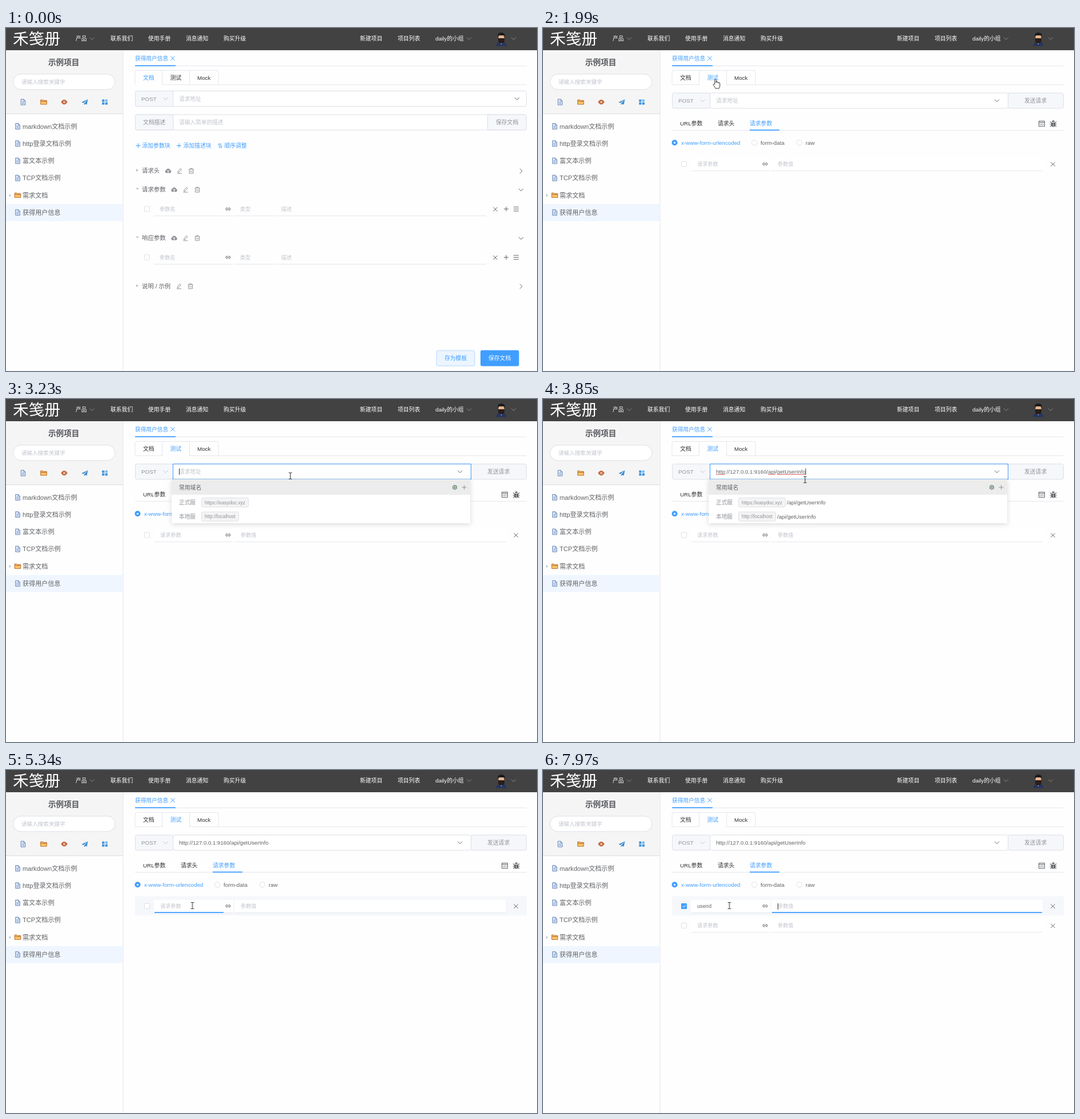
Write an HTML page that moves like this. It is 930 px wide and 602 px high and loops after 8000 ms.

```html
<!DOCTYPE html>
<html lang="zh-CN">
<head>
<meta charset="utf-8">
<title>接口测试演示</title>
<style>
html, body { margin: 0; width: 100%; height: 100%; overflow: hidden; background: #fefefe; }
svg { display: block; }
text { font-family: 'Liberation Sans', 'Noto Sans CJK SC', 'Noto Sans CJK', sans-serif; white-space: pre; }
.icon { fill: none; stroke: currentColor; stroke-width: 1; }
.grow { transform-box: fill-box; transform-origin: center; }
#drop { transform-origin: 290px 141px; }
#dropBox { filter: drop-shadow(0 2px 4px rgba(0, 0, 0, .14)); }
</style>
</head>
<body>
<svg id="stage" width="930" height="602" viewBox="0 0 930 602">
  <defs>
    <g id="down" class="icon"><path d="M-4-2 0 2 4-2"/></g>
    <g id="right" class="icon"><path d="M-2-4 2 0-2 4"/></g>
    <g id="cross" class="icon"><path d="M-3.7-3.7 3.7 3.7M3.7-3.7-3.7 3.7"/></g>
    <g id="plus" class="icon"><path d="M-4 0H4M0-4V4"/></g>
    <g id="menu" class="icon"><path d="M-4.5-3.5H4.5M-4.5 0H4.5M-4.5 3.5H4.5"/></g>
    <g id="link" class="icon"><path d="M-.8-2H-2a2 2 0 0 0 0 4h1.2M.8-2H2a2 2 0 0 1 0 4H.8M-2 0H2"/></g>
    <g id="sort" class="icon"><path d="M-1.3 4V-4L-4-1M1.3-4V4L4 1"/></g>
    <g id="cloud">
      <path d="M-2.8 4a2.7 2.7 0 0 1-.5-5.3 3.5 3.5 0 0 1 6.7 0A2.7 2.7 0 0 1 2.9 4Z" fill="currentColor"/>
      <path d="M0 4V-.5M-2 1 0-1 2 1" fill="none" stroke="#fff"/>
    </g>
    <g id="pencil" class="icon"><path d="M-3 3.2-2.4.6 1.5-4 3.4-2.4-.5 2.3ZM-4 4.6H4"/></g>
    <g id="trash" class="icon"><path d="M-4.5-2.7H4.5M-1.6-2.7V-4.3H1.6V-2.7M-3.5-2.7V4.5H3.5V-2.7M-1.2-.5V2.5M1.2-.5V2.5"/></g>
    <g id="doc">
      <path d="M-3.8-5H1L3.8-2V5H-3.8Z" fill="#dce7f8" stroke="#6685b5"/>
      <path d="M1-5V-2H3.8M-2 0H2M-2 2.3H2" fill="none" stroke="#6685b5" stroke-width=".8"/>
    </g>
    <g id="folder">
      <path d="M-5.3 4V-4H-1.5L-.3-2.8H5.3V4Z" fill="#f6c667" stroke="#c26a30"/>
      <path d="M-5-1.3H5" stroke="#c26a30" stroke-width="1.2"/>
    </g>
    <g id="eye">
      <path d="M-5.7 0Q0-8.4 5.7 0 0 8.4-5.7 0Z" fill="#c4683d"/>
      <circle r="1.8" fill="#fff"/><circle r=".8" fill="#8c3f20"/>
    </g>
    <g id="plane"><path d="M5.5-5-5.5.3-2.5 1.8ZM5.5-5-1.2 2.6V5.3L.7 3.3 3.5 4.5Z" fill="#3b8ccf"/></g>
    <g id="grid">
      <path d="M-4.8-4.6H-.6V-.6H-4.8ZM-4.8.6H-.6V4.6H-4.8ZM.7.6H4.9V4.6H.7Z" fill="#3c93de"/>
      <path d="M.7-4.6H4.9V-.6H.7Z" fill="#75b8f0"/>
    </g>
    <g id="code" class="icon">
      <path d="M-5-4.7H5V4.7H-5ZM-5-2.5H5"/>
      <path d="M-1.7-.7-3.3 1-1.7 2.7M1.7-.7 3.3 1 1.7 2.7M.6-.9-.6 2.9" stroke-width=".8"/>
    </g>
    <g id="bug">
      <path d="M-2.5-3.2a2.5 2.5 0 0 1 5 0ZM-3.5-2H3.5V2a3.5 3.5 0 0 1-7 0Z" fill="currentColor"/>
      <path d="M-5.5-3.7-3-1.2M5.5-3.7 3-1.2M-6 1H6M-5.3 5.2-3 2.8M5.3 5.2 3 2.8" stroke="currentColor" stroke-width="1.2"/>
      <path d="M0-1V5" stroke="#fff" stroke-width=".8"/>
    </g>
    <g id="gear">
      <path d="M0-4.5 4-2.3V2.3L0 4.5-4 2.3V-2.3Z" fill="#7f9885"/>
      <circle r="2.2" fill="#e9eeea"/><circle r="1.2" fill="#587a62"/>
    </g>
  </defs>
</svg>
<script>
const LOOP = 8000;
const BLUE = '#409eff', INK = '#303133', TEXT = '#606266', MUTE = '#909399',
      HINT = '#c0c4cc', EDGE = '#dcdfe6', PALE = '#f5f7fa';
const stage = document.getElementById('stage');

const text = (x, y, size, str, fill = TEXT, more = '') =>
  `<text x="${x}" y="${(y + size * .37).toFixed(2)}" font-size="${size}" fill="${fill}" ${more}>${str}</text>`;
const icon = (id, x, y, color = TEXT, more = '') =>
  `<use href="#${id}" x="${x}" y="${y}" color="${color}" ${more}/>`;
const rect = (x, y, w, h, fill, more = '') =>
  `<rect x="${x}" y="${y}" width="${w}" height="${h}" fill="${fill}" ${more}/>`;
const rule = (x1, x2, y, color = '#e4e7ed') => rect(x1, y - .5, x2 - x1, 1, color);
const box = (x, y, w, h, fill = '#fff', edge = EDGE, more = '') =>
  rect(x, y, w, h, fill, `stroke="${edge}" rx="3" ${more}`);
const group = (id, ...parts) => `<g id="${id}">${parts.join('')}</g>`;
const checkbox = y => box(242.5, y - 4.5, 9, 9, '#fff', EDGE, 'style="rx:1px"');

function header() {
  const menu = [[122, '产品'], [183, '联系我们'], [249, '使用手册'], [315, '消息通知'], [381, '购买升级'],
    [620, '新建项目'], [686, '项目列表'], [752, 'daily的小组']];
  return rect(0, 0, 930, 39, '#424242') +
    text(12, 19, 27.7, '禾笺册', '#fff', 'font-weight="300"') +
    menu.map(([x, s]) => text(x, 18.8, 9.8, s, '#fff')).join('') +
    [151, 811, 889].map(x => icon('down', x, 18.5, '#8a8a8a')).join('') +
    `<g transform="translate(867.5 20)">
      <path d="M-9 11.5Q-8 5-3 4H3Q8 5 9 11.5Z" fill="#25345f"/>
      <path d="M-2.5 4 0 9 2.5 4Z" fill="#d9dde8"/>
      <rect x="-5" y="-9" width="10" height="12" rx="4" fill="#e6b48c"/>
      <path d="M-6-4V-9Q-4-12 0-12T6-9V-4L4-7H-4Z" fill="#1c1a1c"/>
      <path d="M-5.5-2H5.5V3Q4 7 0 7T-5.5 3Z" fill="#2a1d1b"/>
    </g>`;
}

function sidebar() {
  const items = ['markdown文档示例', 'http登录文档示例', '富文本示例', 'TCP文档示例', '需求文档', '获得用户信息'];
  return rect(0, 39, 205, 111, '#f5f5f5') + rule(0, 205, 150.5, '#dcdcdc') +
    rect(204.5, 39, 1, 563, '#e4e6ea') +
    text(74, 60, 13.6, '示例项目', '#55575c', 'font-weight="600"') +
    rect(12.5, 81, 178.5, 27, '#fff', `rx="13.5" stroke="${EDGE}"`) +
    text(27, 94.5, 9.6, '请输入搜索关键字', HINT) +
    ['doc', 'folder', 'eye', 'plane', 'grid'].map((id, i) => icon(id, [30, 66, 102, 138, 173][i], 130)).join('') +
    rect(0, 309, 204.5, 30, '#eff6ff') +
    items.map((s, i) => {
      const y = 172.5 + i * 30.25;
      return icon(i == 4 ? 'folder' : 'doc', 20.5, y) + text(29, y, 11.1, s);
    }).join('') +
    '<path d="M5.5 291 9 293.8 5.5 296.6Z" fill="#c0c4cc"/>';
}

function tabs() {
  return text(226, 53, 9.7, '获得用户信息', BLUE) + icon('cross', 292, 53.2, BLUE, 'stroke-width=".8"') +
    rule(226, 912, 66.5) + rect(226, 65.3, 71, 1.8, BLUE) +
    rule(226, 912, 99.5) +
    `<path d="M226 99.5V77.5a3 3 0 0 1 3-3H369a3 3 0 0 1 3 3V99.5M273.5 74.5V99.5M321.5 74.5V99.5" fill="none" stroke="#e4e7ed"/>` +
    rect(226.5, 98.9, 46.5, 1.3, '#fefefe', 'id="gap"') +
    text(240, 87.5, 9.8, '文档', BLUE, 'id="tabDoc"') +
    text(287.5, 87.5, 9.8, '测试', INK, 'id="tabTest"') +
    text(335, 87.5, 9.8, 'Mock', INK);
}

const method = y => rect(226.5, y, 66, 27, PALE, `stroke="${EDGE}" rx="3"`) +
  text(237, y + 13.7, 9.8, 'POST', MUTE) + icon('down', 279.5, y + 13.5, HINT);

function section(y, title, open, tools) {
  const tri = open ? 'M-2.5-2.5H3L.2 1Z' : 'M-2-3.3 2-.5-2 2.3Z';
  return `<path transform="translate(230 ${y})" d="${tri}" fill="#c0c4cc"/>` +
    text(238, y, 10.4, title, TEXT, 'font-weight="500"') +
    tools.map(([id, x]) => icon(id, x, y + .3, MUTE)).join('') +
    icon(open ? 'down' : 'right', 902, y + .8);
}

const fields = y => checkbox(y) + text(269, y, 9.2, '参数名', HINT) + icon('link', 389, y) +
  text(410, y, 9.2, '类型', HINT) + text(482, y, 9.2, '描述', HINT) +
  rule(260, 397, y + 12) + rule(400, 470, y + 12) + rule(472, 841, y + 12) +
  icon('cross', 857, y + .5) + icon('plus', 876, y) + icon('menu', 893.5, y);

function docPanel() {
  const tools = x => [['cloud', x], ['pencil', x + 20], ['trash', x + 40.5]];
  return box(226.5, 110.5, 685, 27) + method(110.5) + text(303, 124.2, 9.7, '请求地址', HINT) +
    icon('down', 895, 124) +
    box(226.5, 152, 685, 27) + box(226.5, 152, 66.5, 27, PALE) + box(843.5, 152, 68, 27, PALE) +
    text(240, 165.5, 9.8, '文档描述', MUTE) + text(303, 165.5, 9.7, '请输入简单的描述', HINT) +
    text(858, 165.5, 9.8, '保存文档', MUTE) +
    icon('plus', 231.5, 206.5, BLUE) + text(238.5, 206.8, 9.8, '添加参数块', BLUE) +
    icon('plus', 303, 206.5, BLUE) + text(310.5, 206.8, 9.8, '添加描述块', BLUE) +
    icon('sort', 375, 206.5, BLUE) + text(382.5, 206.8, 9.8, '顺序调整', BLUE) +
    section(250.3, '请求头', false, tools(284)) +
    section(283.3, '请求参数', true, tools(294.5)) + fields(317.7) +
    section(368.2, '响应参数', true, tools(294.5)) + fields(402.5) +
    section(452.8, '说明 / 示例', false, [['pencil', 303], ['trash', 323]]) +
    box(754, 566, 67, 27, '#ecf5ff', '#b3d8ff') + text(768, 579.7, 9.8, '存为模板', BLUE) +
    rect(831, 565.5, 67.5, 28, BLUE, 'rx="3" id="save"') + text(845, 579.7, 9.8, '保存文档', '#fff');
}

const pair = (y, tag = '') => checkbox(y) +
  rect(259, y - 10.5, 139, 22, '#fff') + rect(400, y - 10.5, 475, 22, '#fff') +
  rule(260, 397, y + 12) + rule(400, 875, y + 12) +
  text(270, y, 9.2, '请求参数', HINT, tag) + icon('link', 389, y) + text(411, y, 9.2, '参数值', HINT) +
  icon('cross', 893, y + .5, TEXT);

function testPanel() {
  const url = 'http://127.0.0.1:9160/api/getUserInfo';
  return box(292.5, 114, 522, 27) + box(814.5, 114, 97, 27, PALE) + method(114) +
    text(843, 127.5, 9.8, '发送请求', MUTE) +
    rect(292.5, 114, 522, 27, 'none', `id="hoverEdge" stroke="${HINT}"`) +
    rect(292.5, 114, 522, 27, 'none', `id="focusEdge" stroke="${BLUE}"`) +
    icon('down', 795, 127.5) +
    text(303, 127.7, 9.7, '请求地址', HINT, 'id="urlHint"') +
    text(303, 127.5, 9.67, url, TEXT, 'id="url"') +
    group('spell', rule(303, 319, 132.5, '#e65a5a'), rule(394, 407, 132.5, '#e65a5a'), rule(409.5, 460, 132.5, '#e65a5a')) +
    rect(303, 122, 1, 11, INK, 'id="urlCaret0"') + rect(459.5, 122, 1, 11, INK, 'id="urlCaret1"') +
    text(240, 167.6, 9.8, 'URL参数', INK) + text(306, 167.6, 9.8, '请求头', INK) + text(362, 167.6, 9.8, '请求参数', BLUE) +
    rule(226, 912, 179.5) + rect(362, 178.3, 52, 1.8, BLUE) +
    icon('code', 873.5, 168) + icon('bug', 893.7, 168) +
    `<circle cx="230.5" cy="201.3" r="5" fill="${BLUE}"/><circle cx="230.5" cy="201.3" r="1.6" fill="#fff"/>` +
    [370.3, 449].map(x => `<circle cx="${x}" cy="201.3" r="4.7" fill="#fff" stroke="${EDGE}"/>`).join('') +
    text(242, 201.2, 9.75, 'x-www-form-urlencoded', BLUE) + text(381, 201.2, 9.8, 'form-data') + text(460, 201.2, 9.8, 'raw') +
    rect(226, 221.5, 686, 34, PALE, 'id="rowHover"') +
    pair(238.7, 'id="keyHint"') + icon('cross', 893, 239.2, '#5fae86', 'id="greenCross"') +
    group('checked', rect(242, 234, 10, 10, BLUE, 'rx="1"'),
      '<path d="M244.5 239 246.5 241 249.8 236.8" fill="none" stroke="#fff"/>') +
    rect(260, 249.2, 121, 1.8, BLUE, 'id="keyLine" class="grow"') +
    rect(401, 249.2, 473, 1.8, BLUE, 'id="valueLine" class="grow"') +
    [...'userid'].map((c, i) => text(270, 238.7, 9.2, 'userid'.slice(0, i + 1), TEXT, `id="key${i}"`)).join('') +
    group('keyBlink', rect(270, 234, 1, 11, INK, 'id="keyCaret"')) + rect(411, 234, 1, 11, INK, 'id="valueCaret"') +
    group('row2', pair(273));
}

function dropdown() {
  const row = (y, name, host, w, path) => text(303, y, 9.7, name, MUTE) +
    box(342.5, y - 8, w, 16, '#f4f4f5', '#e0e1e4', 'style="rx:2px"') +
    text(348, y, 8.35, host, MUTE) + text(path, y, 9.65, '/api/getUserInfo', TEXT, 'class="path"');
  return rect(290, 141, 523, 77, '#fff', 'id="dropBox"') + rect(290, 141, 523, 27, '#ececec') +
    text(303, 155, 9.8, '常用域名') + icon('gear', 786, 155) + icon('plus', 802.5, 155, MUTE) +
    row(181.5, '正式服', 'https://easydoc.xyz', 82, 427) + row(206.2, '本地服', 'http://localhost', 65, 410);
}

const pointer = group('cursor',
  '<path id="arrow" d="M0 0V11.5L2.6 9.2 4.4 13 6 12.2 4.4 8.6H7.8Z" fill="#fff" stroke="#333" stroke-width=".9"/>',
  '<path id="hand" d="M-1.2 9V1.2a1.2 1.2 0 0 1 2.4 0V6L1.2 4.8a1.1 1.1 0 0 1 2.2 0V6a1.1 1.1 0 0 1 2.2.2V7a1.1 1.1 0 0 1 2.2.4V11Q7.8 14 6.3 16H0Q-1-12 0 13L-3.8 9.6Q-3.6 7.2-1.2 9Z" fill="#fff" stroke="#222" stroke-width=".9"/>'.replace('Q-1-12 0 13', 'Q-.6 14.2-1.6 13'),
  '<path id="beam" d="M-2.7-5.5H-.8L0-5 .8-5.5H2.7M0-5V5M-2.7 5.5H-.8L0 5 .8 5.5H2.7" fill="none" stroke="#222"/>');

stage.insertAdjacentHTML('beforeend', header() + sidebar() + tabs() +
  group('doc-panel', docPanel()) + group('test-panel', testPanel()) + group('drop', dropdown()) + pointer);

// Keyframes are written in milliseconds and hold their value until the next one.
let css = '', count = 0;
function keys(sel, ...steps) {
  const name = 'k' + count++;
  css += `@keyframes ${name}{${steps.map(([t, rule]) => `${t / LOOP * 100}%{${rule}}`).join('')}}
${sel}{animation:${name} ${LOOP}ms step-end infinite}\n`;
}
// Hidden at first, then toggled at each given time.
const show = (sel, ...times) =>
  keys(sel, ...(times[0] ? [[0, 'opacity:0']] : []), ...times.map((t, i) => [t, `opacity:${i % 2 ? 0 : 1}`]));
const stretch = (sel, axis, ...steps) =>
  keys(sel, ...steps.map(([t, v, alpha = v ? 1 : 0]) => [t, `transform:scale${axis}(${v});opacity:${alpha}`]));

show('#doc-panel', 0, 1990);
show('#test-panel', 1990);
keys('#tabDoc', [0, `fill:${BLUE}`], [1990, `fill:${INK}`]);
keys('#tabTest', [0, `fill:${INK}`], [1070, `fill:${BLUE}`]);
keys('#gap', [0, 'transform:none'], [1990, 'transform:translateX(47.5px)']);
keys('#save', [0, `fill:${BLUE}`], [240, 'fill:#66b1ff'], [315, `fill:${BLUE}`]);

show('#hoverEdge', 2540, 3080);
keys('#focusEdge', [0, 'opacity:0'], [3080, 'opacity:1'], [4310, 'opacity:.7'], [4390, 'opacity:.3'], [4460, 'opacity:0']);
show('#urlHint', 0, 3460);
show('#url', 3460);
show('.path', 3460);
show('#spell', 3540, 4310);
show('#urlCaret0', 3080, 3460);
show('#urlCaret1', 3460, 4070);
stretch('#drop', 'Y', [0, 0], [3080, .45, .45], [3150, .85, .85], [3230, 1], [4310, .57, .57], [4390, .12, .12], [4460, 0]);

show('#greenCross', 4310, 4550);
show('#rowHover', 4550);
show('#keyHint', 0, 6900);
show('#row2', 6900);
show('#checked', 7050);
stretch('#keyLine', 'X', [0, 0], [4790, .4], [4870, .8], [4940, 1], [7820, .6], [7900, .25], [7970, 0]);
stretch('#valueLine', 'X', [0, 0], [7820, .4], [7900, .8], [7970, 1]);
show('#keyBlink', 4790, 5340, 5890, 6440, 6900, 7820);
show('#valueCaret', 7820);

const typed = [6900, 7050, 7130, 7280, 7510, 7590];
typed.forEach((t, i) => show('#key' + i, t, typed[i + 1] || LOOP));
keys('#keyCaret', [0, 'transform:none'], ...typed.map((t, i) =>
  [t, `transform:translateX(${document.getElementById('key' + i).getComputedTextLength()}px)`]));

show('#cursor > #arrow', 240, 1070, 2380, 2540, 3930, 4550);
show('#hand', 1070, 2380);
show('#beam', 2540, 3930, 4550);
const path = [[0, 848, 588], [240, 848, 588, 6], [690, 400, 176, 4], [990, 305, 100], [1070, 305, 95], [1150, 303, 92],
  [1230, 302, 90], [2220, 302, 91, 2], [2380, 308, 100, 2], [2540, 320, 112], [2620, 341, 119.5], [2700, 392, 128],
  [2770, 439, 134.5], [2850, 475, 135], [2930, 498, 135], [3690, 490, 137], [3770, 474, 139], [3850, 459, 141.5],
  [3930, 435, 165, 4], [4230, 337, 290], [4390, 333, 272], [4460, 328, 256], [4550, 326, 247], [4630, 326, 241], [4710, 326.5, 238]];
keys('#cursor', ...path.map(([t, x, y, n = 1]) =>
  [t, `transform:translate(${x}px,${y}px);animation-timing-function:steps(${n})`]));

document.head.appendChild(document.createElement('style')).textContent = css;
</script>
</body>
</html>
```
